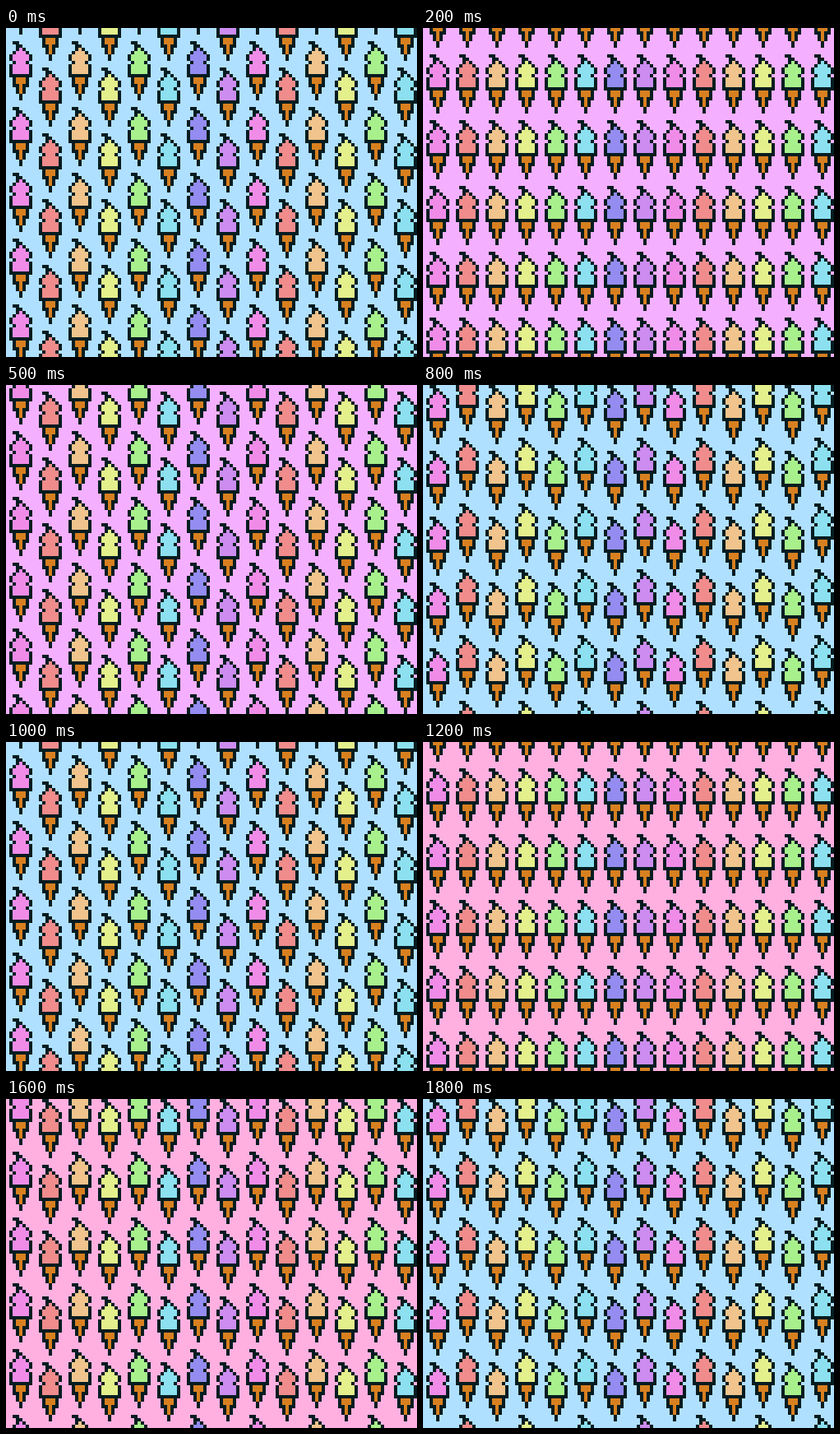
An HTML page with a canvas that plays this animation: 500 px wide and 400 px high, repeating every 1.9 s.

```html
<!DOCTYPE html>
<html lang="en">
<head>
<meta charset="utf-8">
<title>Ice cream pattern</title>
<style>
  html, body { margin: 0; width: 100%; height: 100%; overflow: hidden; }
  canvas { display: block; }
</style>
</head>
<body>
<canvas id="stage" width="500" height="400"></canvas>
<script>
const ctx = document.getElementById('stage').getContext('2d');
const CELL = 4, COLUMN = 36, ROW = 80, STEP_MS = 100, STEPS = 19;

// '#' outline, 'i' ice cream, 'o' cone
const CONE = [
  '.##....',
  '..##...',
  '..#i#..',
  '.#iii#.',
  '#iiiii#',
  '#iiiii#',
  '.#iii#.',
  '#iiiii#',
  '#iiiii#',
  '#iiiii#',
  '#######',
  '.#ooo#.',
  '.#ooo#.',
  '.##o##.',
  '..#o#..',
  '..#o#..',
  '...#...',
  '...#...'
];
const FLAVOURS = ['#f08ce8', '#f08c8c', '#f0c48c', '#e4f08c',
                  '#a8f08c', '#8ce0f0', '#948cf0', '#cc8cf0'];
const SKIES = ['#b0e0ff', '#f4b0ff', '#b0e0ff', '#ffb0e0'];

function drawCone(x, y, flavour) {
  const colours = { '#': '#041c20', i: flavour, o: '#d88020' };
  CONE.forEach((line, row) => {
    [...line].forEach((key, col) => {
      if (key === '.') return;
      ctx.fillStyle = colours[key];
      ctx.fillRect(x + col * CELL, y + row * CELL, CELL, CELL);
    });
  });
}

function drawScene(step) {
  // The sky changes whenever neighbouring columns line up.
  ctx.fillStyle = SKIES[Math.floor((step + 3) / 5) % SKIES.length];
  ctx.fillRect(0, 0, 500, 400);

  for (let col = 0; col < 14; col++) {
    const shift = col % 2 ? 48 - 8 * step : 16 + 8 * step;
    const top = ((shift % ROW) + ROW) % ROW - ROW;
    for (let y = top; y < 400; y += ROW) {
      drawCone(4 + col * COLUMN, y, FLAVOURS[col % FLAVOURS.length]);
    }
  }
}

const start = performance.now();
function tick() {
  const elapsed = performance.now() - start;
  drawScene(Math.floor(elapsed / STEP_MS) % STEPS);
  requestAnimationFrame(tick);
}
tick();
</script>
</body>
</html>
```
